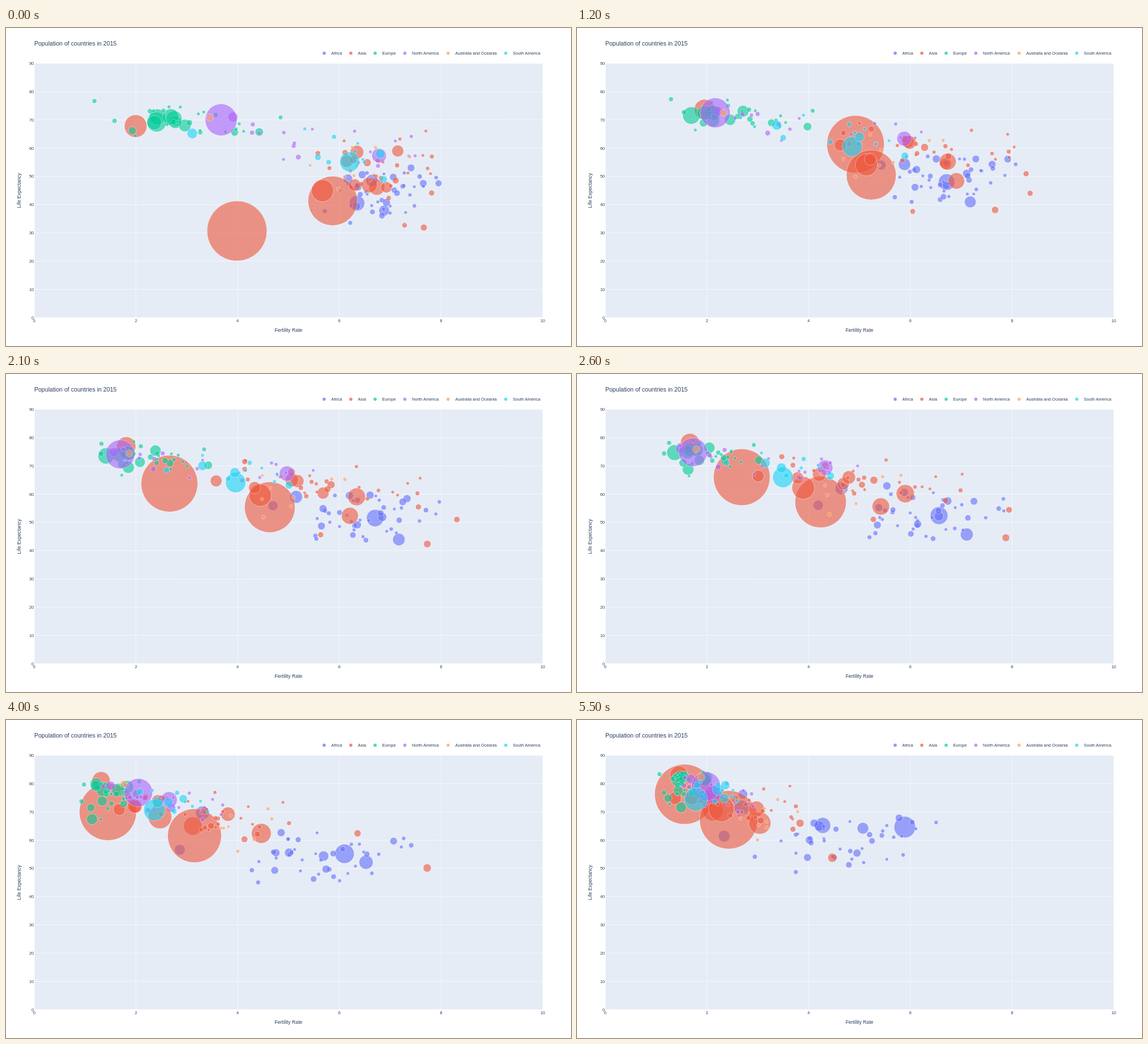
These frames come from a looping animation (998x561 px, 5.6 s). An HTML page with a canvas:

```html
<!DOCTYPE html>
<html lang="en">
<head>
<meta charset="utf-8">
<title>Population of countries in 2015</title>
<style>
html, body { margin: 0; width: 100%; height: 100%; overflow: hidden; background: #fff; }
canvas, svg { position: absolute; left: 0; top: 0; width: 100%; height: 100%; display: block; }
text { font-family: "Liberation Sans", Arial, sans-serif; fill: #2a3f5f; }
</style>
</head>
<body>
<canvas></canvas>
<svg viewBox="0 0 1600 900" preserveAspectRatio="none"></svg>
<script>
const W = 998, H = 561, STEP = 100, YEARS = 56;
const canvas = document.querySelector("canvas"), ctx = canvas.getContext("2d");
const svg = document.querySelector("svg");
const dpr = window.devicePixelRatio || 1;
canvas.width = W * dpr;
canvas.height = H * dpr;

const px = f => 49.9 + 89.82 * f;
const py = l => 511.1 - 4.986 * l;
const AFRICA = "#636efa", ASIA = "#ef553b", EUROPE = "#00cc96",
      NORTH = "#ab63fa", OCEANIA = "#ffa15a", SOUTH = "#19d3f3";

// Labels, in the 1600 x 900 layout of the chart
function label(str, x, y, size, anchor = "start", turn = 0) {
  const el = document.createElementNS(svg.namespaceURI, "text");
  el.setAttribute("x", x);
  el.setAttribute("y", y);
  el.setAttribute("font-size", size);
  el.setAttribute("text-anchor", anchor);
  if (turn) el.setAttribute("transform", `rotate(${turn} ${x} ${y})`);
  el.textContent = str;
  svg.append(el);
}
const legend = [
  ["Africa", 901, AFRICA], ["Asia", 976.5, ASIA], ["Europe", 1045.3, EUROPE],
  ["North America", 1129.5, NORTH], ["Australia and Oceania", 1252, OCEANIA],
  ["South America", 1415.3, SOUTH]
];
label("Population of countries in 2015", 80, 50, 17);
label("Fertility Rate", 800, 860.3, 14, "middle");
label("Life Expectancy", 41, 460, 14, "middle", -90);
for (let i = 0; i <= 10; i += 2) label(i, 80 + 144 * i, 833, 12, "middle");
for (let i = 0; i <= 90; i += 10) label(i, 79, 824.2 - 8 * i, 12, "end");
for (const [name, x] of legend) label(name, x + 20, 75.6, 12);

const KEYS = [0, 17, 40, 55];
const bubbles = [];
let color, seed = 15;

function rnd() {
  seed = (seed + 0x6d2b79f5) | 0;
  let v = Math.imul(seed ^ (seed >>> 15), 1 | seed);
  v = (v + Math.imul(v ^ (v >>> 7), 61 | v)) ^ v;
  return ((v ^ (v >>> 14)) >>> 0) / 4294967296;
}

// Smooth curve through the values vs at the years ts
function curve(ts, vs, t) {
  const n = ts.length - 1;
  let i = 0;
  while (i < n - 1 && t >= ts[i + 1]) i++;
  const slope = k => {
    const a = Math.max(k - 1, 0), b = Math.min(k + 1, n);
    return (vs[b] - vs[a]) / (ts[b] - ts[a]);
  };
  const d = ts[i + 1] - ts[i], u = (t - ts[i]) / d;
  return vs[i] + (vs[i + 1] - vs[i]) * u * u * (3 - 2 * u)
    + d * u * (1 - u) * ((1 - u) * slope(i) - u * slope(i + 1));
}

// Sizes are relative to the largest country, whose own growth slows down
const GROWTH = 0.433;
function radius(r0, r1, t) {
  const u = t / 55;
  return (r0 + (r1 * (1 + GROWTH) - r0) * u) / (1 + GROWTH * (1 - (1 - u) ** 1.6));
}

// A large country: first and last radius, a few points on its way
function bubble(r0, r1, pts, keys = KEYS) {
  const xs = pts.filter((_, i) => i % 2 === 0), ys = pts.filter((_, i) => i % 2);
  bubbles.push({ color, at: t => [curve(keys, xs, t), curve(keys, ys, t), radius(r0, r1, t)] });
}

// Small countries keep their place in a cloud: [x, width, y, tilt, height] per key year
function cloud(n, maxR, ...shapes) {
  const part = k => shapes.map(s => s[k]);
  const [x, w, y, tilt, h] = [0, 1, 2, 3, 4].map(part);
  for (let i = 0; i < n; i++) {
    const u = rnd() + rnd() - 1, v = rnd() + rnd() - 1;
    const r = 3 + (maxR - 3) * rnd() ** 2.5;
    const phase = 7 * rnd();
    bubbles.push({ color, at: t => {
      const a = u + 0.12 * Math.sin(phase + t / 9), b = v + 0.12 * Math.cos(phase + t / 11);
      return [
        curve(KEYS, x, t) + a * curve(KEYS, w, t),
        curve(KEYS, y, t) + a * curve(KEYS, tilt, t) + b * curve(KEYS, h, t), r];
    } });
  }
}

color = AFRICA;
bubble(6.5, 8.5, [737,274, 700,226, 292,155, 293,131]);
bubble(10.5, 13.5, [646,269, 545,228, 347,164, 291,155]);
bubble(9.5, 14, [668,322, 697,299, 636,251, 434,186]);
bubble(6, 9, [764,274, 741,221, 500,234, 428,187]);
bubble(13.7, 19, [620,309, 657,260, 598,236, 579,189]);
bubble(8.3, 10.5, [604,266, 504,235, 307,229, 260,205]);
bubble(6.5, 10.3, [684,263, 680,254, 561,240, 505,191]);
cloud(39, 7.5, [664,115,290,0,55], [652,130,257,5,50], [570,190,240,5,50], [480,190,212,-5,50]);

color = ASIA;
bubble(6, 8, [738,352, 739,309, 744,261, 451,243]);
bubble(14, 18, [655,281, 649,261, 330,187, 240,160]);
bubble(4.5, 6.5, [676,300, 585,330, 538,421, 562,290, 308,171], [0, 13, 17, 20, 55]);
bubble(53, 53,
  [408,358, 345,341, 724,259, 612,234, 492,205, 308,202, 291,182, 180,162, 190,131],
  [0, 1, 3, 6, 12, 17, 26, 40, 55]);
bubble(43.7, 51.5, [577,305, 492,244, 333,204, 268,176]);
bubble(19.5, 22.5, [559,287, 482,225, 272,171, 255,157]);
bubble(10, 12.5, [672,281, 615,223, 229,153, 203,137]);
bubble(20, 16, [229,173, 220,134, 168,107, 180,97]);
bubble(14, 19.5, [642,277, 643,223, 451,200, 323,182]);
bubble(10.5, 14, [692,217, 544,194, 392,166, 317,157]);
bubble(11, 11, [602,235, 412,196, 200,158, 173,138]);
bubble(10.8, 11.8, [616,277, 476,214, 268,143, 240,133]);
bubble(12, 13.3, [620,219, 553,194, 227,152, 226,137]);
bubble(4.7, 7, [704,348, 811,271, 621,200, 394,182]);
cloud(26, 7.5, [645,135,237,5,65], [575,230,193,30,40], [335,170,160,25,45], [285,125,145,20,45]);

color = EUROPE;
bubble(14, 11.4, [297,160, 221,144, 214,118, 228,102]);
bubble(17.4, 12.7, [266,166, 184,149, 172,122, 179,105]);
bubble(14.3, 10.5, [267,157, 229,145, 159,113, 183,100]);
bubble(11, 8.7, [316,172, 252,158, 170,143, 179,125]);
bubble(11.3, 9.7, [299,166, 282,140, 159,116, 188,100]);
bubble(12.8, 9.5, [262,167, 229,163, 152,175, 184,154]);
bubble(14.6, 11.3, [291,157, 207,146, 198,123, 226,105]);
cloud(25, 7.5, [310,170,170,10,45], [260,125,155,10,38], [185,60,143,-10,45], [182,40,122,-10,42]);

color = NORTH;
bubble(8.7, 8.3, [401,157, 207,142, 185,116, 201,104]);
bubble(12.9, 15.8, [659,225, 537,184, 288,141, 240,132]);
bubble(28.3, 25.7, [380,162, 210,145, 234,128, 228,117]);
cloud(17, 5, [590,230,215,25,55], [415,260,175,30,35], [300,150,150,25,30], [255,95,138,20,35]);

color = OCEANIA;
bubble(6.5, 7, [360,158, 230,145, 208,113, 219,101]);
cloud(8, 3.5, [610,190,240,15,65], [520,230,212,5,55], [410,150,185,5,50], [330,110,172,0,50]);

color = SOUTH;
bubble(9.3, 8.3, [329,186, 354,166, 287,145, 260,138]);
bubble(17.6, 20.5, [607,236, 440,199, 262,159, 210,140]);
bubble(5.7, 6, [551,228, 309,180, 237,126, 212,115]);
bubble(8.4, 10, [661,222, 442,181, 268,145, 249,123]);
bubble(6.5, 8, [667,267, 538,209, 313,139, 262,115]);
cloud(7, 6, [615,140,228,20,50], [470,180,182,25,35], [315,130,150,15,30], [270,85,138,10,30]);

function line(x0, y0, x1, y1, width) {
  ctx.lineWidth = width;
  ctx.beginPath();
  ctx.moveTo(x0, y0);
  ctx.lineTo(x1, y1);
  ctx.stroke();
}

function disc(x, y, r, fill) {
  ctx.fillStyle = fill;
  ctx.beginPath();
  ctx.arc(x, y, r - 0.31, 0, 7);
  ctx.fill();
  ctx.lineWidth = 0.62;
  ctx.beginPath();
  ctx.arc(x, y, r, 0, 2 * Math.PI);
  ctx.stroke();
}

function draw(year) {
  ctx.setTransform(dpr, 0, 0, dpr, 0, 0);
  ctx.globalAlpha = 1;
  ctx.fillStyle = "#fff";
  ctx.fillRect(0, 0, W, H);
  ctx.fillStyle = "#e5ecf6";
  ctx.fillRect(px(0), py(90), px(10) - px(0), py(0) - py(90));
  ctx.strokeStyle = "#fff";
  for (let f = 0; f <= 10; f += 2) line(px(f), py(0), px(f), py(90), f ? 0.62 : 1.25);
  for (let l = 0; l <= 90; l += 10) line(px(0), py(l), px(10), py(l), l ? 0.62 : 1.25);
  ctx.globalAlpha = 0.6;
  for (const b of bubbles) disc(...b.at(year), b.color);
  ctx.globalAlpha = 0.7;
  for (const [, x, fill] of legend) disc(x * W / 1600, 44.4, 3.3, fill);
}

let shown = -1;
function tick() {
  const year = Math.floor(performance.now() / STEP) % YEARS;
  if (year !== shown) draw(shown = year);
  requestAnimationFrame(tick);
}
tick();
</script>
</body>
</html>
```
